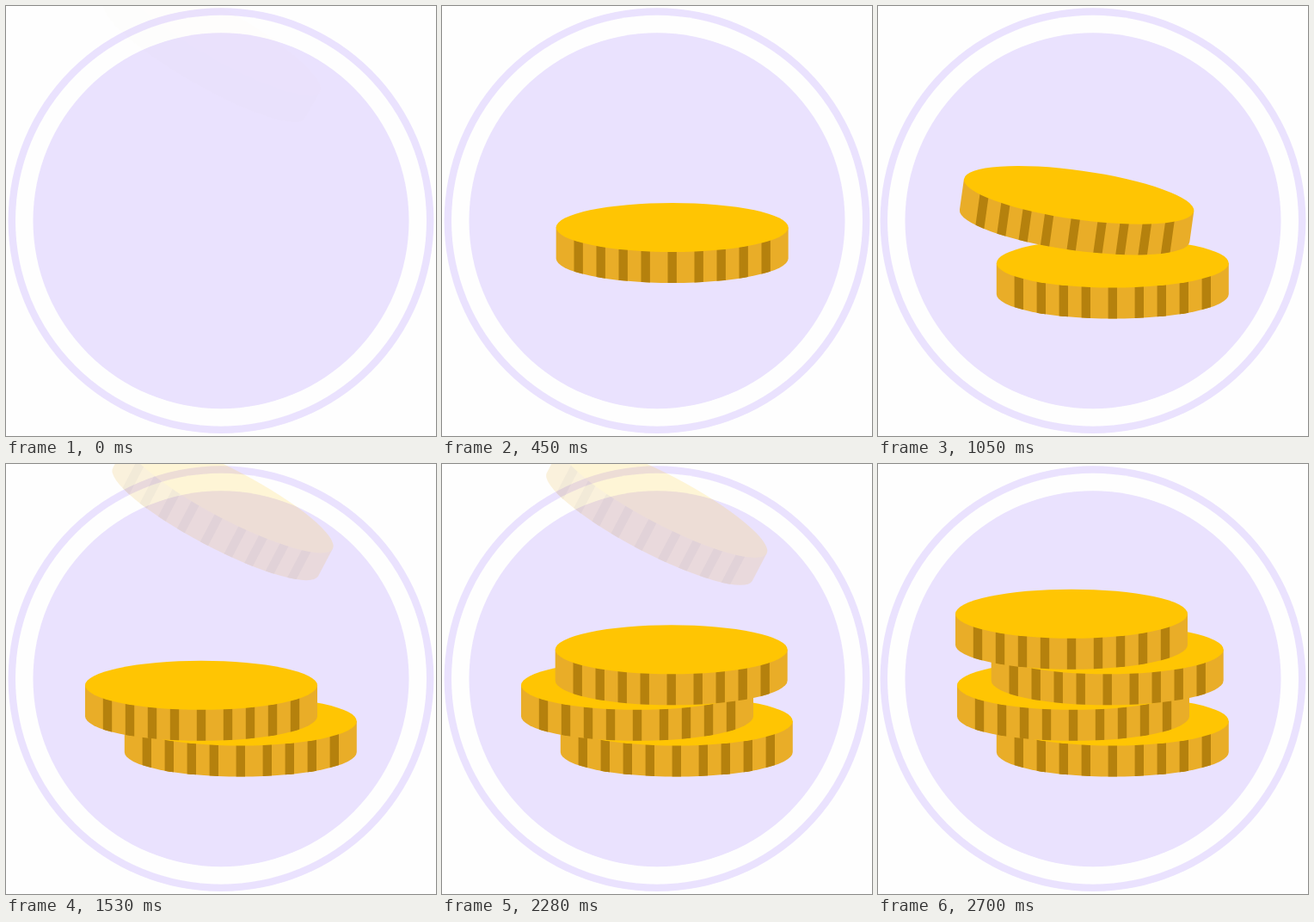
An HTML page with a canvas for the animation above (3630 ms loop, 500 by 500 pixels).

```html
<!DOCTYPE html>
<html lang="en">
<head>
<meta charset="utf-8">
<title>Coin stack</title>
<style>
  html, body { margin: 0; width: 100%; height: 100%; overflow: hidden; background: #fefefe; }
  canvas { display: block; width: 500px; height: 500px; }
</style>
</head>
<body>
<canvas id="stage" width="500" height="500"></canvas>
<script>
const SIZE = 500, LOOP = 3630;
const FADE = 205, TURN = 410, TILT = 30;
const RX = 135, RY = 28.5, HALF = 18;
const STRIPES = [0, 31, 57, 83, 109];
const STRIPE_W = 10.4;

const coins = [
  { start: 0, fall: 600, from: [239.6, 48], to: [272.8, 317] },
  { start: 750, fall: 410, from: [250.7, 59.7], to: [227, 275.3] },
  { start: 1500, fall: 410, from: [251.8, 48.6], to: [266.7, 233.8] },
  { start: 2250, fall: 410, from: [250.1, 55], to: [225, 192.2] }
];

const ctx = document.getElementById('stage').getContext('2d');
const layer = document.createElement('canvas');
layer.width = layer.height = SIZE;
const pen = layer.getContext('2d');

const clamp = v => Math.min(1, Math.max(0, v));
const smooth = s => s * s * (3 - 2 * s);
const mix = (a, b, p) => a + (b - a) * p;

function disc(r, color) {
  ctx.fillStyle = color;
  ctx.beginPath();
  ctx.arc(250, 249.7, r, 0, Math.PI * 2);
  ctx.fill();
}

function drawCoin(g) {
  g.beginPath();
  g.moveTo(RX, -HALF);
  g.lineTo(RX, HALF);
  g.ellipse(0, HALF, RX, RY, 0, 0, Math.PI);
  g.lineTo(-RX, -HALF);
  g.closePath();
  g.fillStyle = '#e9ad28';
  g.fill();

  g.save();
  g.clip();
  g.fillStyle = '#b5810d';
  for (const x of STRIPES) {
    for (const side of x ? [-1, 1] : [1]) {
      g.fillRect(side * x - STRIPE_W / 2, -HALF, STRIPE_W, 80);
    }
  }
  g.restore();

  g.fillStyle = '#ffc503';
  g.beginPath();
  g.ellipse(0, -HALF, RX, RY, 0, 0, Math.PI * 2);
  g.fill();
}

function showCoin(coin, time) {
  const t = time - coin.start;
  if (t <= 0) return;
  const p = smooth(clamp(t / coin.fall));
  const angle = TILT * (1 - clamp(t / TURN)) * Math.PI / 180;

  // The layer lets the whole coin fade as one shape.
  pen.setTransform(1, 0, 0, 1, 0, 0);
  pen.clearRect(0, 0, SIZE, SIZE);
  pen.translate(mix(coin.from[0], coin.to[0], p), mix(coin.from[1], coin.to[1], p));
  pen.rotate(angle);
  drawCoin(pen);

  ctx.globalAlpha = clamp(t / FADE);
  ctx.drawImage(layer, 0, 0);
  ctx.globalAlpha = 1;
}

function render(time) {
  ctx.fillStyle = '#fefefe';
  ctx.fillRect(0, 0, SIZE, SIZE);
  disc(247.4, '#eae2fe');
  disc(239, '#fefefe');
  disc(218.5, '#eae2fe');
  for (const coin of coins) showCoin(coin, time);
}

const begin = performance.now();
function tick() {
  render((performance.now() - begin) % LOOP);
  requestAnimationFrame(tick);
}
render(0);
requestAnimationFrame(tick);
</script>
</body>
</html>
```
